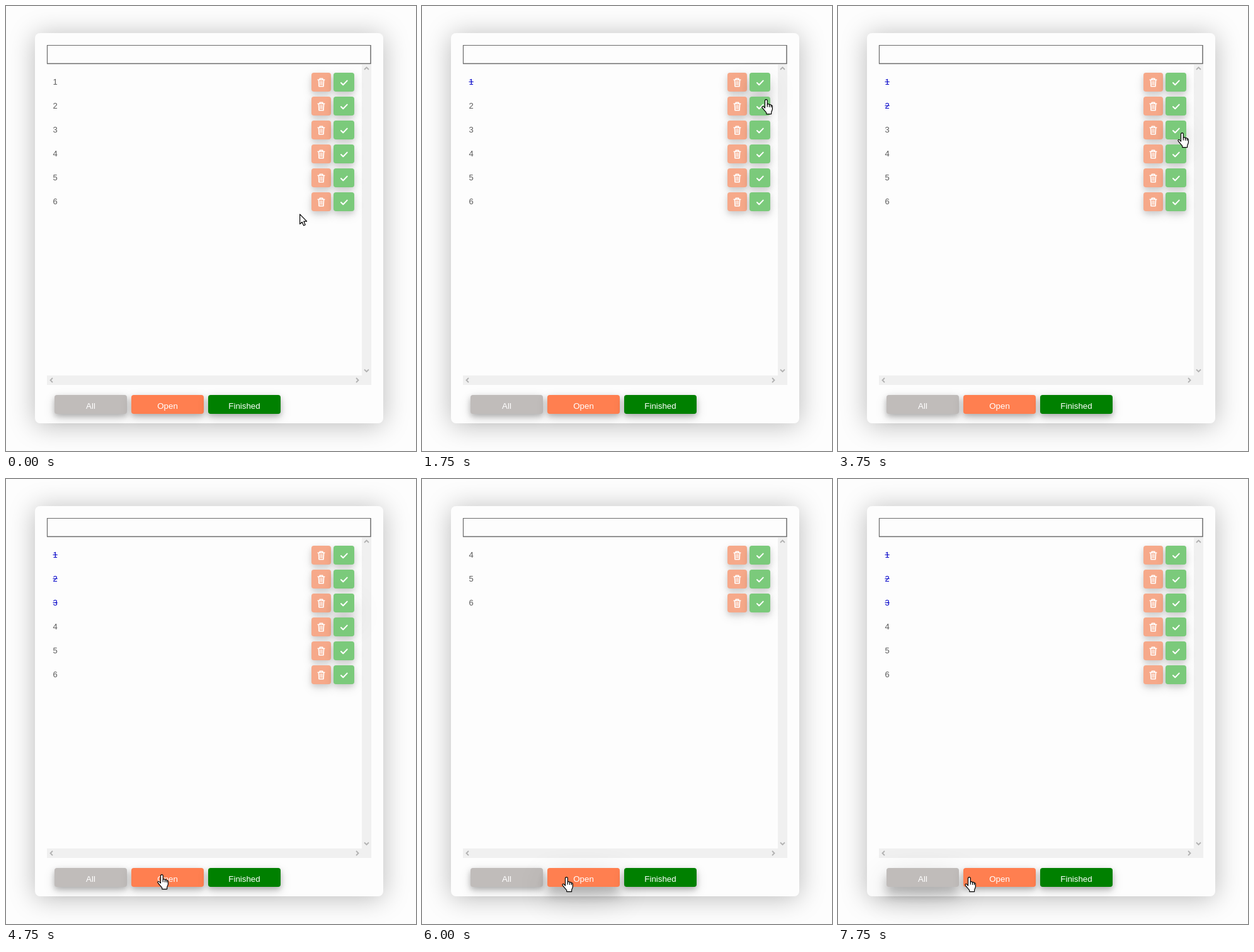
An HTML page that plays this animation: 651 px wide and 707 px high, repeating every 8000 ms.

```html
<!DOCTYPE html>
<html lang="en">
<head>
<meta charset="utf-8">
<title>Todo list</title>
<style>
html, body { margin: 0; width: 100%; height: 100%; overflow: hidden; background: #fdfdfd; }
body { position: relative; font-family: Arial, "Liberation Sans", sans-serif; }
div, svg { position: absolute; }
.card { left: 46px; top: 43px; width: 553px; height: 620px; border-radius: 8px;
  background: #fdfdfd; box-shadow: 0 3px 42px rgba(0,0,0,.27); }
.row { left: 0; width: 565px; height: 30px; }
.label { left: 74.5px; font-size: 13px; line-height: 30px; color: #5c5c5c; }
.label.done { color: #0000c8; text-decoration: line-through; }
.btn { top: 0; height: 30px; border-radius: 4px; color: #fff; }
.del { left: 485px; width: 31px; background: #f6a98a; }
.ok { left: 520px; width: 33px; background: #7bca7b; }
.tab { top: 618px; width: 115px; font-size: 13.333px; line-height: 35px; text-align: center; }
svg { left: 0; top: 0; fill: none; }
</style>
</head>
<body>
<div class="card"></div>
<svg width="651" height="707">
  <path d="M65.5 92V62.5H579" stroke="#6a6a6a" stroke-width="1.2"/>
  <path d="M65 91.5H579V62" stroke="#6c6c6c" stroke-width="1.5"/>
  <path d="M565 93H580V602H65V587H565Z" fill="#f0f0f0"/>
  <g stroke="#b2b2b2" stroke-width="1.8">
    <path d="M569 101l3.5-3.5 3.5 3.5M569 577.5l3.5 3.5 3.5-3.5M74 591l-3.5 3.5 3.5 3.5M556 591l3.5 3.5-3.5 3.5"/>
  </g>
</svg>
<div id="list"></div>
<div id="tabs"></div>
<svg width="651" height="707">
  <g id="arrow" fill="#fff" stroke="#000" stroke-width="1.2" stroke-linejoin="round">
    <path d="M.6.9V16.4L4.1 13.2 6.6 18.8 9.2 17.7 6.8 12.1H11.6Z"/>
  </g>
  <g id="hand" fill="#fff" stroke="#000" stroke-width="1.2" stroke-linejoin="round" stroke-linecap="round">
    <path d="M5.5 14V2.6a1.9 1.9 0 0 1 3.8 0V8.5c.3-1.3 3-1.3 3.2.3v.4c.6-1.1 2.7-.8 2.9.6v.5c.8-.8 2-.3 2 1.2V15.5c0 2.2-1.4 3.6-1.8 5.5V23.6H7.8V21.5C6.5 19.5 3.5 17 1.2 13.4.4 12 1.8 10.8 3.2 11.6Z"/>
    <path d="M9.3 8.5V12M12.5 9V12.3M15.4 10V12.6"/>
  </g>
</svg>
<script>
const LOOP = 8000, STEP = 250, RAMP = 0.65;
const $ = id => document.getElementById(id);

// time, cursor left, cursor top, hovered button
const path = [
  [0, 466, 330, ''],
  [250, 530, 228, 'ok4'],
  [500, 537, 163, 'ok2'],
  [750, 535, 121, 'ok1'],
  [1000, 536, 115, 'ok1'],
  [1500, 538, 126, 'ok1'],
  [1750, 539, 148, 'ok2'],
  [2000, 537, 190, 'ok3'],
  [2250, 536, 158, 'ok2'],
  [3000, 535, 194, 'ok3'],
  [3250, 532, 215, 'ok4'],
  [3500, 532, 191, 'ok3'],
  [3750, 539, 201, 'ok3'],
  [4750, 240, 628, 'Open'],
  [5000, 115, 632, 'All'],
  [5250, 219, 632, 'Open'],
  [5500, 222, 632, 'Open'],
  [7000, 172, 632, 'All'],
  [7250, 156, 632, 'All'],
  [7500, 144, 639, 'All'],
  [7750, 201, 632, 'Open']
];
const doneAt = { 1: 1750, 2: 2750, 3: 4500 };
const openOnly = t => t >= 6000 && t < 7500;
const poseAt = t => path.filter(p => p[0] <= t).pop();

function add(parent, cls, html = '') {
  const el = document.createElement('div');
  el.className = cls;
  el.innerHTML = html;
  parent.append(el);
  return el;
}

const icon = d => `<svg width="33" height="30" stroke="#fff" stroke-linecap="round" stroke-linejoin="round">${d}</svg>`;
const trash = icon('<path d="M10.2 11.3H20.8M13.2 11V9.2H17.8V11M11.4 11.5L12 21.8H19L19.6 11.5" stroke-width="1.6"/>' +
  '<path d="M13.8 13.5V19.5M15.5 13.5V19.5M17.2 13.5V19.5" stroke-width=".9"/>');
const check = icon('<path d="M12 16L15.3 19.3 21.7 12.6" stroke-width="2"/>');

const buttons = {};
const rows = [1, 2, 3, 4, 5, 6].map(n => {
  const el = add($('list'), 'row');
  const label = add(el, 'label', n);
  buttons['del' + n] = add(el, 'btn del', trash);
  buttons['ok' + n] = add(el, 'btn ok', check);
  return { n, el, label };
});
[['All', '#c0bcba'], ['Open', '#ff7f50'], ['Finished', '#008000']].forEach(([name, color], i) => {
  const el = add($('tabs'), 'btn tab', name);
  el.style.left = 77 + 122 * i + 'px';
  el.style.background = color;
  buttons[name] = el;
});

// Hover strength builds up and fades one step after the pointer arrives or leaves
function hoverLevel(id, t) {
  let v = 0;
  for (let s = 0; s < t; s += STEP) {
    v += poseAt(s)[3] === id ? RAMP : -RAMP;
    v = Math.max(0, Math.min(1, v));
  }
  return v;
}

const mix = (a, b, k) => a + (b - a) * k;
function shadow(k, fade) {
  const layer = (y, blur, alpha) => `0 ${y}px ${blur}px rgba(0,0,0,${alpha * fade})`;
  return layer(mix(4, 12, k), mix(9, 16, k), mix(.22, .24, k)) + ',' +
    layer(mix(6, 17, k), mix(18, 50, k), mix(.15, .19, k));
}

function draw(t) {
  const [, x, y] = poseAt(t);
  const arrow = t < STEP;
  $('arrow').style.display = arrow ? '' : 'none';
  $('hand').style.display = arrow ? 'none' : '';
  $(arrow ? 'arrow' : 'hand').setAttribute('transform', `translate(${x} ${y})`);

  let slot = 0;
  for (const { n, el, label } of rows) {
    const done = t >= doneAt[n];
    const shown = !(done && openOnly(t));
    label.classList.toggle('done', done);
    el.style.display = shown ? '' : 'none';
    if (shown) el.style.top = 106 + 38 * slot++ + 'px';
  }
  for (const id in buttons) {
    const fade = /\d/.test(id) ? .65 : 1;
    buttons[id].style.boxShadow = shadow(hoverLevel(id, t), fade);
  }
}

let last = -1;
function tick() {
  const t = Math.floor(performance.now() % LOOP / STEP) * STEP;
  if (t !== last) draw(last = t);
  requestAnimationFrame(tick);
}
tick();
</script>
</body>
</html>
```
